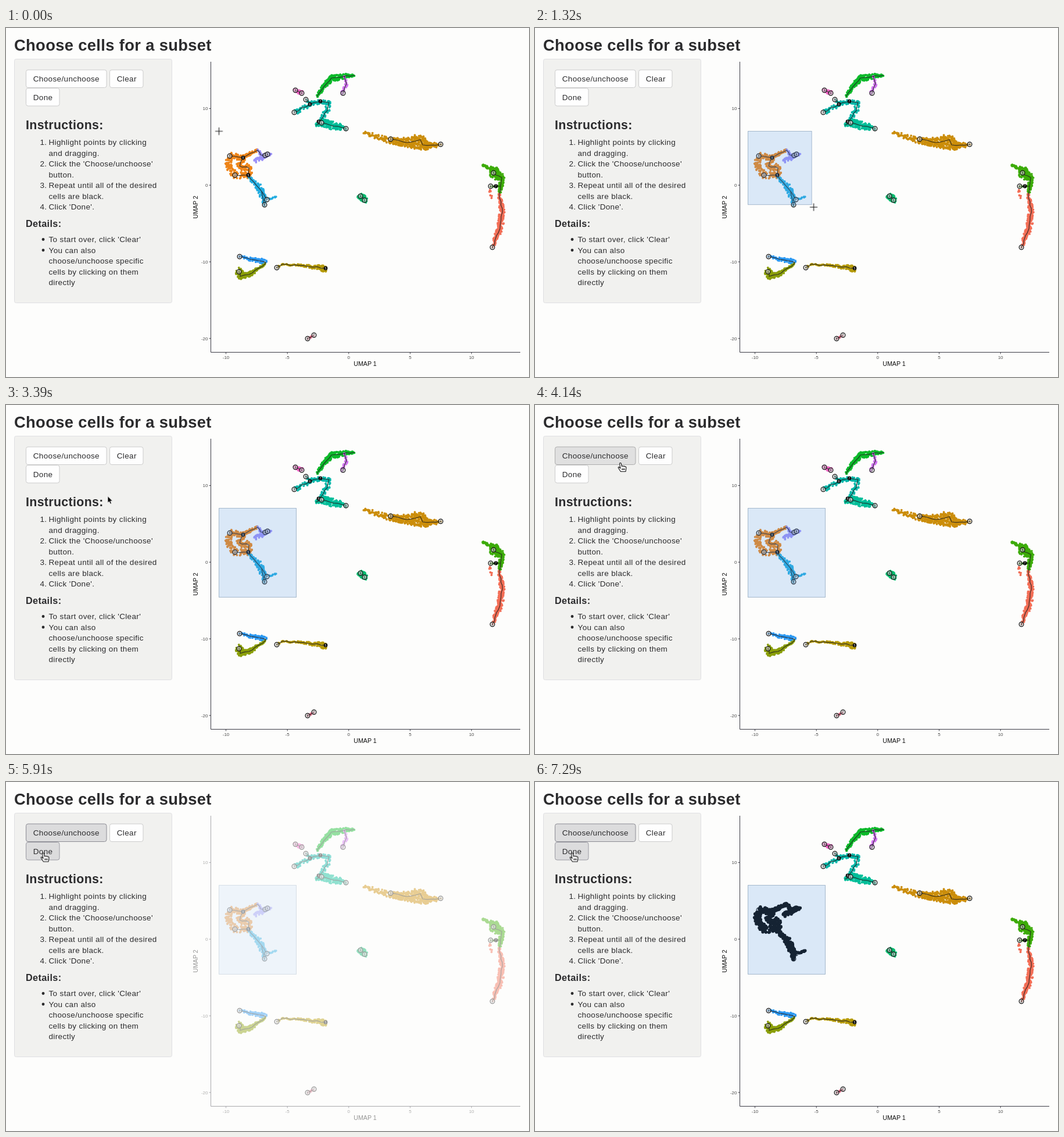
Animation of 900 by 600 pixels, one loop 8.46 s. Source, as an HTML page:

```html
<!DOCTYPE html>
<html lang="en">
<head>
<meta charset="utf-8">
<title>Choose cells for a subset</title>
<style>
  html, body { margin: 0; width: 100%; height: 100%; overflow: hidden; background: #fdfdfc; }
  svg { display: block; width: 900px; height: 600px; font-family: "Liberation Sans", Arial, sans-serif; }
  .ui { fill: #2b2b2d; font-size: 13.5px; letter-spacing: .027em; }
  .ui .head { font-weight: bold; }
  .panel { fill: #f1f1ef; stroke: #dfdfe2; }
  .button rect { fill: #fefefe; stroke: #ccc; }
  .axes { stroke: #3a3a44; fill: none; }
  .tick { font-size: 8px; fill: #4d4d4d; }
  .label { font-size: 10.7px; fill: #111; }
  .dots { fill: none; stroke-width: 3.9; stroke-linecap: round; }
  .dots.chosen { stroke: #000; stroke-width: 5.6; }
  .graph { fill: none; stroke: #222; stroke-opacity: .85; stroke-width: 1.2; stroke-linejoin: round; }
  .node circle { fill: #d3d3d3; fill-opacity: .6; stroke: #111; stroke-width: 1.2; }
  .node text { font-size: 5px; text-anchor: middle; fill: #222; }
  .hub circle { fill: #000; fill-opacity: 1; }
  .hub text { fill: #fff; }
  .brush { fill: rgb(96 160 232 / .22); stroke: rgb(0 51 102 / .3); }
  .cursor path { stroke: #111; stroke-width: 1.1; stroke-linejoin: round; fill: #fff; }
  .cursor .arrow { fill: #000; stroke: #fff; stroke-width: .8; }

  .brush, .cursor, .cursor > g, .plot, .chosen, .button rect {
    animation: 8460ms linear infinite;
  }
  .brush { animation-name: brush; }
  .cursor { animation-name: travel; }
  .plot { animation-name: recalculate; }
  .cursor > g, .chosen, .button rect { animation-timing-function: step-end; }
  .cursor .cross { animation-name: cross; }
  .cursor .grab { animation-name: grab; }
  .cursor .default { animation-name: default-arrow; }
  .cursor .pointer { animation-name: pointer; }
  .chosen { animation-name: chosen; }
  #choose rect { animation-name: press-choose; }
  #done rect { animation-name: press-done; }

  @keyframes travel {
    0% { transform: translate(366.5px, 177.5px); }
    7.1% { transform: translate(366.5px, 177.5px); animation-timing-function: ease-in-out; }
    18.75%, 29.08% { transform: translate(499.5px, 331px); animation-timing-function: ease-in; }
    31.21% { transform: translate(474px, 328px); }
    39.01% { transform: translate(185px, 175px); animation-timing-function: ease-out; }
    48.94% { transform: translate(150px, 107px); }
    51.42%, 61.7% { transform: translate(141px, 99px); }
    63.12% { transform: translate(106px, 112.5px); animation-timing-function: ease-out; }
    66.31%, 100% { transform: translate(67px, 129.5px); }
  }
  @keyframes brush {
    0% { width: 0; height: 0; opacity: 0; }
    7.34% { width: 0; height: 0; opacity: 0; animation-timing-function: ease-in-out; }
    7.7% { opacity: 1; }
    19%, 100% { width: 133px; height: 153px; opacity: 1; }
  }
  @keyframes recalculate {
    0%, 68.09% { opacity: 1; animation-timing-function: ease; }
    71.04% { opacity: .36; animation-timing-function: step-end; }
    79.08%, 100% { opacity: 1; }
  }
  @keyframes chosen { 0% { opacity: 0; } 79.08%, 100% { opacity: 1; } }
  @keyframes cross {
    0% { opacity: 1; } 24.82% { opacity: 0; } 34.1% { opacity: 1; } 35.9%, 100% { opacity: 0; }
  }
  @keyframes grab { 0% { opacity: 0; } 24.82% { opacity: 1; } 34.1%, 100% { opacity: 0; } }
  @keyframes default-arrow {
    0% { opacity: 0; } 35.9% { opacity: 1; } 46.1% { opacity: 0; }
    61.9% { opacity: 1; } 65%, 100% { opacity: 0; }
  }
  @keyframes pointer {
    0% { opacity: 0; } 46.1% { opacity: 1; } 61.9% { opacity: 0; } 65%, 100% { opacity: 1; }
  }
  @keyframes press-choose {
    0% { fill: #fefefe; stroke: #ccc; }
    46.1% { fill: #e0e0e0; stroke: #adadad; }
    54.96%, 100% { fill: #dcdcdd; stroke: #8c8c94; }
  }
  @keyframes press-done {
    0% { fill: #fefefe; stroke: #ccc; }
    65% { fill: #e0e0e0; stroke: #adadad; }
    68.09%, 100% { fill: #dcdcdd; stroke: #9a9aa2; }
  }
</style>
</head>
<body>
<svg viewBox="0 0 900 600">
  <g class="ui" id="ui">
    <text class="head" x="14" y="39" font-size="27.3">Choose cells for a subset</text>
    <rect class="panel" x="14.5" y="53.5" width="271" height="419" rx="3"/>
    <text class="head" x="34" y="173.5" font-size="21.3">Instructions:</text>
    <text class="head" x="34" y="342" font-size="16.2">Details:</text>
  </g>

  <g class="plot">
    <g class="axes">
      <path d="M352.5 58V557.5H885"/>
      <path id="ticks"/>
    </g>
    <g id="tickLabels" class="tick"></g>
    <text class="label" x="618" y="580.5" text-anchor="middle">UMAP 1</text>
    <text class="label" transform="translate(329.5 308) rotate(-90)" text-anchor="middle">UMAP 2</text>
    <g id="cells"></g>
    <g id="graph"></g>
    <g id="nodes"></g>
    <g id="chosenCells"></g>
    <rect class="brush" x="366.5" y="177.5" width="0" height="0"/>
  </g>

  <g class="cursor">
    <g class="cross"><path d="M-6.5 0H6.5M0-6.5V6.5"/></g>
    <g class="grab">
      <path d="M-3 7.5L-6 2Q-8-1-6-1.5Q-5-1.5-4 1L-5-4Q-5-6-3.5-5.5L-2-1V-6Q-1-8 .5-6.5L1-1L2.5-6Q4-7.5 4.5-5.5L4 0L6-3Q7.5-4 7.5-2L5 4L4 7.5Z"/>
      <path d="M-1 2V5M1 2V5M3 2V5" stroke-width=".7"/>
    </g>
    <g class="default"><path class="arrow" d="M-4-6.5V5L-1.4 2.7L.6 7L2.6 6L.7 2H4.5Z"/></g>
    <g class="pointer">
      <path d="M-2.5 7.5L-6.5 1.5Q-7.5-.5-5.5-.5L-3 2L-4.5-6Q-4-8.5-2-7L-.5-1.5Q1-3 2-1.5Q4-2.5 4.5-1Q7-1.5 7 1L6 7.5Z"/>
      <path d="M0 2V5M2 2V5M4 2V5" stroke-width=".7"/>
    </g>
  </g>
</svg>

<script>
  const $ = id => document.getElementById(id);

  function add(parent, tag, attrs, text) {
    const el = document.createElementNS(parent.namespaceURI, tag);
    for (const key in attrs) el.setAttribute(key, attrs[key]);
    if (text !== undefined) el.textContent = text;
    return parent.appendChild(el);
  }

  function button(id, x, y, width, label) {
    const g = add($('ui'), 'g', { class: 'button', id });
    add(g, 'rect', { x, y, width, height: 30.5, rx: 3.5 });
    add(g, 'text', { x: x + 12.2, y: y + 20.3 }, label);
  }
  button('choose', 34.5, 72, 138.5, 'Choose/unchoose');
  button('clear', 178.5, 72, 57.5, 'Clear');
  button('done', 34.5, 103.5, 57.5, 'Done');

  // Each item is an array of lines, marked by a number or a bullet
  function list(y, numbered, items) {
    items.forEach((lines, i) => {
      if (numbered) add($('ui'), 'text', { x: 70.5, y, 'text-anchor': 'end' }, `${i + 1}.`);
      else add($('ui'), 'circle', { cx: 64, cy: y - 4.5, r: 2.4 });
      for (const line of lines) {
        add($('ui'), 'text', { x: 73.5, y }, line);
        y += 18.5;
      }
    });
  }
  list(201, true, [
    ['Highlight points by clicking', 'and dragging.'],
    ["Click the 'Choose/unchoose'", 'button.'],
    ['Repeat until all of the desired', 'cells are black.'],
    ["Click 'Done'."]
  ]);
  list(368, false, [
    ["To start over, click 'Clear'"],
    ['You can also', 'choose/unchoose specific', 'cells by clicking on them', 'directly']
  ]);

  let tickPath = '';
  for (let v = -10; v <= 10; v += 5) {
    const x = 589.8 + v * 21.13;
    tickPath += `M${x} 557.5v3`;
    add($('tickLabels'), 'text', { x, y: 568.5, 'text-anchor': 'middle' }, v);
  }
  for (let v = -20; v <= 10; v += 10) {
    const y = 270.2 - v * 13.18;
    tickPath += `M352.5 ${y}h-3`;
    add($('tickLabels'), 'text', { x: 347.5, y: y + 3, 'text-anchor': 'end' }, v);
  }
  $('ticks').setAttribute('d', tickPath);

  let seed = 7;
  const random = () => (seed = (seed * 16807) % 2147483647) / 2147483647;
  const jitter = size => (random() * 2 - 1) * size;

  // Spread of the cells along a trail, t from 0 to 1
  const even = r => () => r;
  const grow = (from, to) => t => from + (to - from) * t;
  const bulge = r => t => 1.5 + r * Math.sin(Math.PI * t);

  // Key points as "x,y"; a trailing "o" marks a leaf node, "x" a hub
  const parse = route => route.split(' ').map(key => {
    const [x, y] = key.split(',').map(parseFloat);
    return { x, y, mark: key.slice(-1) };
  });

  // Walks the route in short steps that stray slightly between key points
  function wander(keys) {
    const steps = [keys[0]];
    for (let i = 1; i < keys.length; i++) {
      const a = keys[i - 1], b = keys[i];
      const n = Math.ceil(Math.hypot(b.x - a.x, b.y - a.y) / 8);
      for (let k = 1; k < n; k++) {
        steps.push({ x: a.x + (b.x - a.x) * k / n + jitter(1.2), y: a.y + (b.y - a.y) * k / n + jitter(1.2) });
      }
      steps.push(b);
    }
    return steps;
  }

  function scatter(steps, spread, density) {
    let d = '';
    const last = steps.length - 1;
    for (let i = 0; i < last; i++) {
      const a = steps[i], b = steps[i + 1];
      const count = density * 8 * (1 + 2 * spread((i + .5) / last));
      for (let k = 0; k < count; k++) {
        const u = random(), angle = random() * 2 * Math.PI;
        const r = spread((i + u) / last) * Math.sqrt(random());
        const x = a.x + (b.x - a.x) * u + r * Math.cos(angle);
        const y = a.y + (b.y - a.y) * u + r * Math.sin(angle);
        d += `M${x.toFixed(1)} ${y.toFixed(1)}h.01`;
      }
    }
    return d;
  }

  function addNode({ x, y, mark }) {
    const hub = mark === 'x';
    const node = add($('nodes'), 'g', { class: hub ? 'node hub' : 'node' });
    add(node, 'circle', { cx: x, cy: y, r: hub ? 2.8 : 3.9 });
    add(node, 'text', { x, y: y + 1.8 }, $('nodes').children.length % 9 + 1);
  }

  function cells(color, density, spread, route, isChosen, steps = wander(parse(route))) {
    const d = scatter(steps, spread, density);
    add($('cells'), 'path', { class: 'dots', stroke: color, d });
    if (isChosen) add($('chosenCells'), 'path', { class: 'dots chosen', d });
  }

  // Cells with their trajectory line and nodes
  function trail(color, density, spread, route, isChosen) {
    const keys = parse(route), steps = wander(keys);
    cells(color, density, spread, route, isChosen, steps);
    add($('graph'), 'path', { class: 'graph', d: 'M' + steps.map(p => `${p.x} ${p.y}`).join('L') });
    keys.filter(key => 'ox'.includes(key.mark)).forEach(addNode);
  }

  const green = '#0cb92a', teal = '#00b6a8', gold = '#cb8d0a', leaf = '#3cab08', red = '#f26d55';
  const orange = '#ee8418', purple = '#9a90f8', cyan = '#22ace0', mustard = '#b59a08';

  trail(green, .28, bulge(4), '600,81 560,86 547,101 535,118');
  trail('#cf70f0', .13, grow(1, 4), '582,82 586,96 580,112o');
  trail('#f062c4', .25, even(3.5), '498,107o 509,112o');
  trail(teal, .12, even(4), '496,145o 523,131x 541,126x 556,128 553,142 538,161x');
  trail(teal, .12, even(2), '516,123o 523,131');
  trail('#00bd98', .2, bulge(6), '533,167 543,163o 558,167 585,173o');

  cells(gold, .12, bulge(4), '614,179 645,189 715,208');
  trail(gold, .16, bulge(9), '662,191o 690,197 713,192 717,201 748,200o');

  cells(leaf, .25, grow(1, 5), '819,235 845,245');
  trail(leaf, .25, grow(9, 2), '839,249o 853,257 851,272 849,285');
  trail(leaf, .1, even(1), '834,272o 843,272x 851,272');
  cells(red, .1, even(2), '832,279 836,292');
  trail(red, .2, bulge(4), '849,285 854,310 850,345 837,377o');

  trail('#06bd70', .5, even(6), '610,289o 617,296o');
  trail('#2a98f2', .13, grow(2, 5), '402,393o 435,400 448,403');
  trail('#8a9e08', .3, grow(1, 7), '447,404 424,421 403,427 401,419o');
  trail(mustard, .2, t => 1 + 6 * t ** 3, '466,412o 476,406 520,410 550,413x');
  trail('#f0708c', .3, even(1), '519,534o 530,528o');

  cells(orange, .15, even(6), '384,226 382,238 392,250', true);
  trail(orange, .16, grow(6, 2), '385,220o 408,223x 433,210', true);
  trail(orange, .12, even(6), '408,223 402,237 418,241 417,253x 394,253o', true);
  cells(purple, .2, even(3.5), '429,228 440,224 454,216', true);
  trail(purple, .15, even(2), '433,210 438,218 446,219o 450,217o', true);
  trail(cyan, .13, bulge(5), '417,253x 440,281 445,304o', true);
  trail(cyan, .13, grow(4, 2), '440,281 449,295o', true);
  cells(cyan, .1, even(1), '449,293 467,291', true);
</script>
</body>
</html>
```
